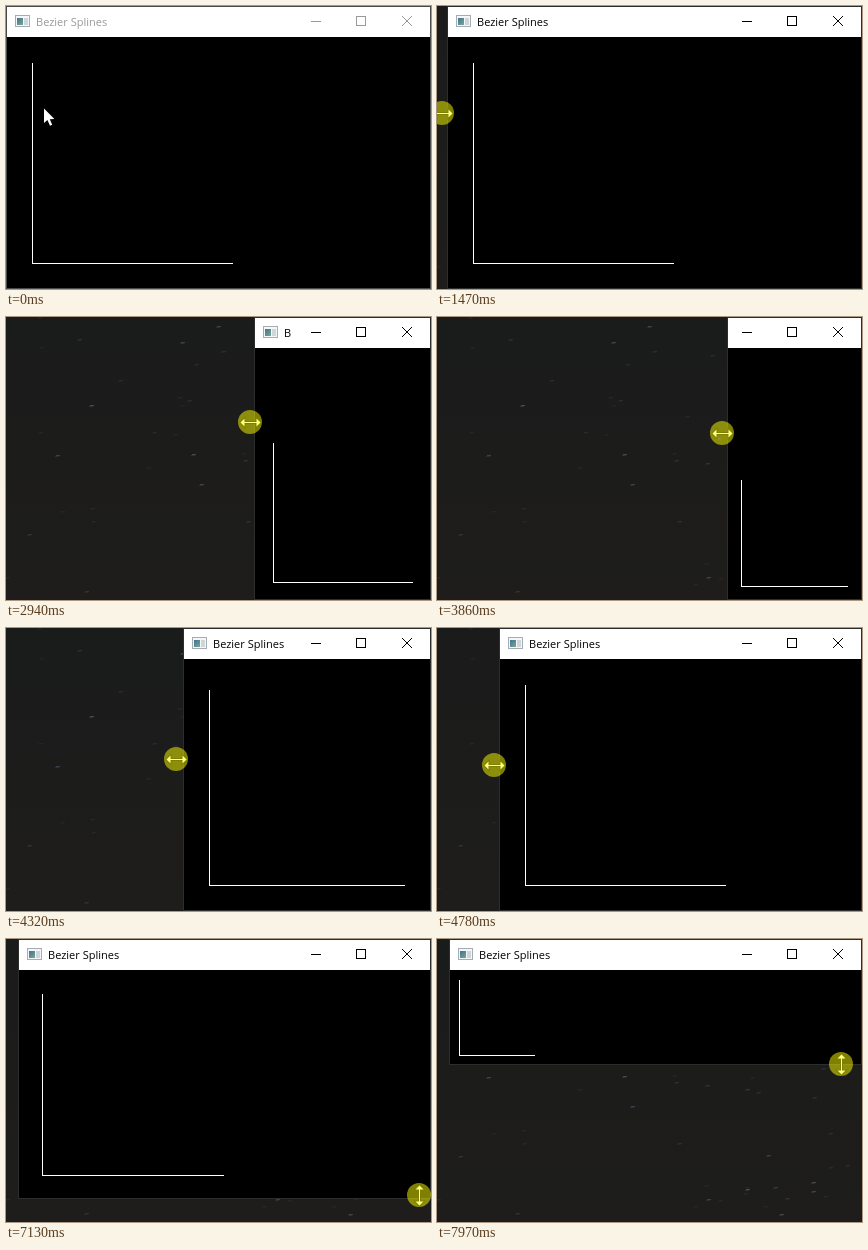
Recreate the animation shown at these times as an HTML page with a canvas. Size 425x283 px, loop 8000 ms.

```html
<!DOCTYPE html>
<html lang="en">
<head>
<meta charset="utf-8">
<title>Bezier Splines</title>
<style>
html, body { margin: 0; width: 100%; height: 100%; overflow: hidden; background: #000; }
canvas { display: block; width: 425px; height: 283px; }
</style>
</head>
<body>
<canvas id="stage" width="425" height="283"></canvas>
<script>
const W = 425, H = 283, LOOP = 8000, TICK = 76.6;
const RIGHT = 424, BOTTOM = 282, BAR = 31, BUTTONS = 287;
const ctx = document.getElementById('stage').getContext('2d');

// Ticks at which the side and the bottom edge are held
const SIDE = { grab: 17, drop: 71 }, BASE = { grab: 84 };

// Pointer path: tick, x, y, gap to the dragged edge
const path = [
  [0, 38, 102], [5, 7, 108], [10, 4, 106], [13, -5, 107], [17, -5, 107],
  [22, 20, 107], [27, 78, 107], [29, 113, 107], [38, 244, 105, 5],
  [45, 295, 110], [50, 285, 116], [56, 170, 131, 8], [60, 77, 136],
  [67, 7, 139], [70, 7, 139], [71, 12, 139], [74, 402, 159], [75, 440, 170],
  [77, 419, 283], [79, 412, 283], [84, 412, 283, -1], [86, 412, 269, 13],
  [92, 412, 269, 13], [93, 413, 256, 3], [104, 404, 125, 0]
].map(([tick, x, y, gap = 6]) => ({ tick, x, y, gap }));

function pointerAt(tick) {
  const n = path.findIndex(p => p.tick > tick);
  if (n < 0) return path[path.length - 1];
  const a = path[n - 1], b = path[n];
  const k = (tick - a.tick) / (b.tick - a.tick);
  const mix = key => Math.round(a[key] + (b[key] - a[key]) * k);
  return { x: mix('x'), y: mix('y'), gap: mix('gap') };
}

function edgesAt(tick) {
  const side = pointerAt(Math.min(SIDE.drop - 1, Math.max(SIDE.grab, tick)));
  const base = pointerAt(Math.max(BASE.grab, tick));
  return { left: side.x + side.gap, bottom: Math.min(BOTTOM, base.y + base.gap) };
}

function box(color, x, y, w, h) {
  ctx.fillStyle = color;
  ctx.fillRect(x, y, w, h);
}

// Soft gradient with faint, seeded light streaks
function paintDesktop() {
  const g = ctx.createLinearGradient(0, 0, 0, H);
  g.addColorStop(0, '#1a1b1b');
  g.addColorStop(1, '#1e1d1b');
  box(g, 0, 0, W, H);
  let seed = 7;
  const rand = () => (seed = seed * 16807 % 2147483647) / 2147483647;
  for (let i = 0; i < 70; i++) {
    const x = Math.floor(rand() * W), y = Math.floor(rand() * H);
    const tint = rand() < 0.15 ? '120,130,190' : '150,135,105';
    const glow = 0.08 + 0.35 * rand() ** 3;
    box(`rgba(${tint},${glow})`, x, y, 4, 1);
    box(`rgba(${tint},${glow / 2})`, x - 1, y + 1, 4, 1);
  }
}

function paintIcon(x, y) {
  box('#a3adb3', x, y, 15, 12);
  box('#f4f6f7', x + 1, y + 1, 13, 10);
  const g = ctx.createLinearGradient(x + 2, y + 3, x + 8, y + 10);
  g.addColorStop(0, '#3f7396');
  g.addColorStop(1, '#7aa68e');
  box(g, x + 2, y + 3, 6, 7);
  box('#cfd6da', x + 9, y + 3, 4, 7);
}

function paintTitle(x, ink) {
  ctx.fillStyle = ink;
  ctx.font = '11px "Open Sans", "Noto Sans", sans-serif';
  let title = 'Bezier Splines';
  while (title && x + ctx.measureText(title).width > BUTTONS) title = title.slice(0, -1);
  ctx.fillText(title, x, 20);
}

function paintButtons(ink) {
  box(ink, 305, 15, 10, 1);
  ctx.strokeStyle = ink;
  ctx.lineWidth = 1;
  ctx.strokeRect(350.5, 10.5, 9, 9);
  ctx.beginPath();
  ctx.moveTo(396, 10);
  ctx.lineTo(406, 20);
  ctx.moveTo(406, 10);
  ctx.lineTo(396, 20);
  ctx.stroke();
}

// Axes sit in the lower left square of the view, inset by a tenth
function paintAxes(left, bottom) {
  const size = Math.min(RIGHT - left, bottom - BAR);
  const x = Math.round(left + 0.1 * size), end = Math.round(left + 0.9 * size);
  const y = Math.round(bottom - 0.1 * size), top = Math.round(bottom - 0.9 * size) + 1;
  box('#fff', x, top, 1, y - top + 1);
  box('#fff', x, y, end - x, 1);
}

function paintWindow({ left, bottom }, active) {
  const ink = active ? '#000' : '#999';
  box(active ? '#2c2e2e' : '#4a4a4a', left - 1, 0, RIGHT - left + 2, bottom + 1);
  box('#fff', left, 1, RIGHT - left, BAR - 1);
  box('#000', left, BAR, RIGHT - left, bottom - BAR);
  if (left + 23 < BUTTONS) paintIcon(left + 8, 9);
  paintTitle(left + 29, ink);
  paintButtons(ink);
  paintAxes(left, bottom);
}

const arrow = new Path2D('M0 .5V15L3.4 11.9L6 17.7L8.2 16.7L5.8 11.2L10.4 11Z');
const resize = new Path2D('M-10 0L-6 -4V-.5H6V-4L10 0L6 4V.5H-6V4Z');

function paintPointer(tick) {
  const { x, y } = pointerAt(tick);
  const side = tick >= 13 && tick <= SIDE.drop, base = tick >= 77;
  ctx.save();
  ctx.translate(x, y);
  if (side || base) ctx.translate(0.5, 0.5);
  if (base) ctx.rotate(Math.PI / 2);
  const shape = side || base ? resize : arrow;
  ctx.strokeStyle = '#000';
  ctx.lineWidth = 2;
  ctx.stroke(shape);
  ctx.fillStyle = '#fff';
  ctx.fill(shape);
  ctx.restore();

  const pressed = (tick >= SIDE.grab && tick < SIDE.drop) || tick >= BASE.grab;
  if (pressed) {
    ctx.fillStyle = 'rgba(255,255,0,.5)';
    ctx.beginPath();
    ctx.arc(x, y, 12, 0, 2 * Math.PI);
    ctx.fill();
  }
}

function frame() {
  const tick = Math.floor(performance.now() % LOOP / TICK);
  paintDesktop();
  paintWindow(edgesAt(tick), tick >= SIDE.grab);
  paintPointer(tick);
  requestAnimationFrame(frame);
}
frame();
</script>
</body>
</html>
```
